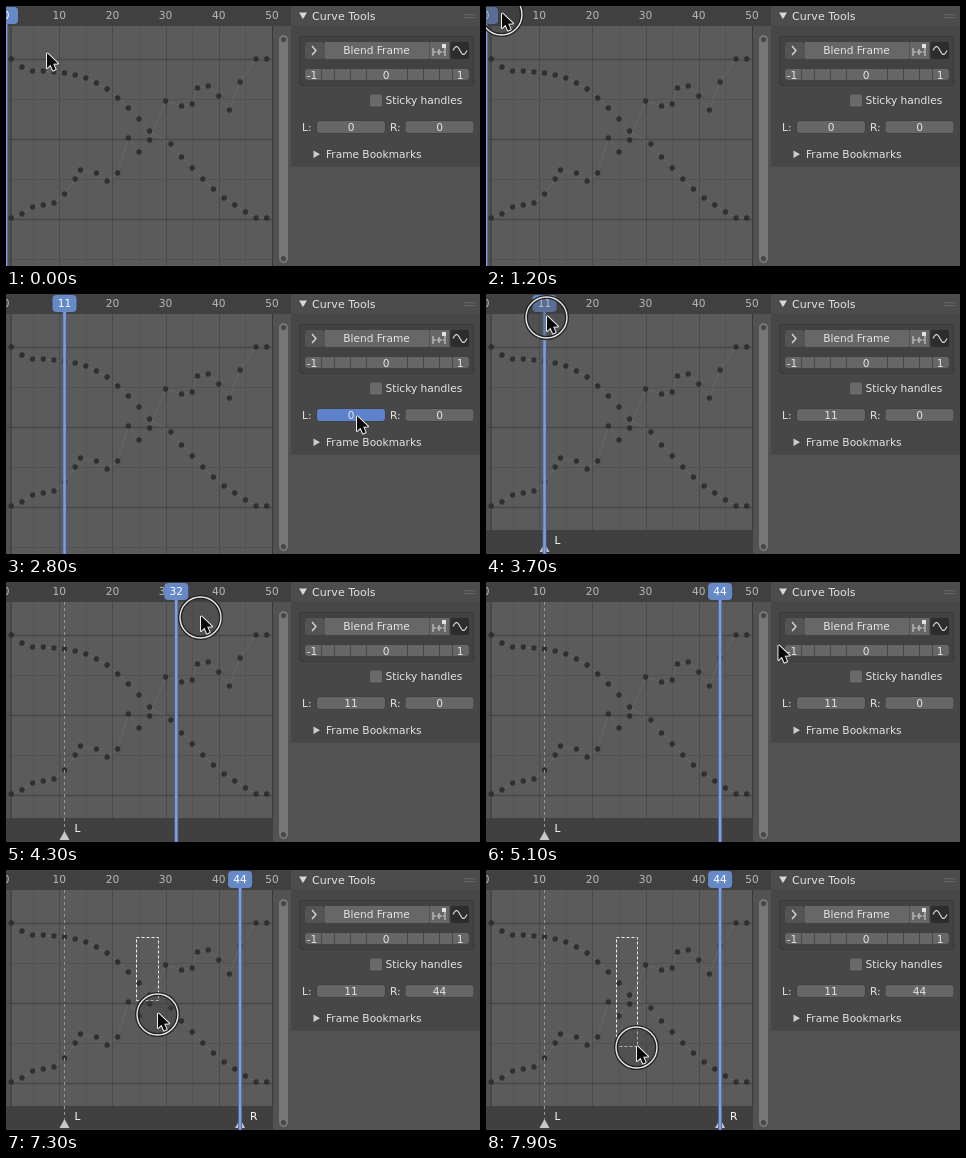
Write an HTML page with a canvas that moves like this. It is 474 by 260 pixels and loops after 8000 ms.

```html
<!DOCTYPE html>
<html lang="en">
<head>
<meta charset="utf-8">
<title>Curve editor</title>
<style>
html, body { margin: 0; width: 100%; height: 100%; overflow: hidden; background: #555; }
canvas { display: block; width: 474px; height: 260px; }
</style>
</head>
<body>
<canvas id="stage"></canvas>
<script>
const W = 474, H = 260, LOOP = 8000, TICK = 100;
const FRAME_W = 5.32, LAG = 100;
const BLUE = '#6689c8', TEXT = '#e4e4e4';
const canvas = document.getElementById('stage');
const ctx = canvas.getContext('2d');
const dpr = window.devicePixelRatio || 1;
canvas.width = W * dpr;
canvas.height = H * dpr;

// Keys as [frame, y]
const falling = [[1, 53], [3, 61], [5, 65], [7, 65], [9, 66], [11, 67], [13, 69], [15, 72], [17, 77],
  [19, 83], [21, 92], [23, 102], [25, 113], [27, 125], [31, 138], [33, 151], [35, 162], [37, 173],
  [39, 183], [41, 192], [43, 199], [45, 206], [47, 212], [49, 212]];
const rising = [[1, 212], [3, 208], [5, 201], [7, 199], [9, 197], [11, 188], [13, 173], [14, 164],
  [17, 167], [19, 175], [21, 167], [23, 132], [25, 146], [27, 134], [30, 95], [33, 100], [35, 98],
  [36, 82], [38, 80], [40, 90], [42, 104], [44, 76], [47, 53], [49, 53]];

// Pointer path as [ms, x, y]
const path = [[0, 41, 47], [600, 2, 8], [1100, 2, 8], [1200, 16, 7], [1800, 59, 8], [1900, 60, 9],
  [2700, 351, 122], [2900, 351, 122], [3600, 61, 22], [3800, 61, 22], [4300, 195, 34], [4500, 232, 38],
  [4800, 232, 38], [5600, 423, 117], [6100, 423, 117], [6500, 202, 80], [6800, 130, 67], [6900, 130, 67],
  [7200, 152, 130], [7300, 152, 143], [7400, 152, 160], [7600, 151, 176], [8000, 151, 176]];
const presses = [[1000, 1900], [3700, 4800], [6900, 8000]];

const frameX = f => f * FRAME_W;

function pointer(t) {
  const i = Math.max(1, path.findIndex(k => k[0] >= t));
  const [t0, x0, y0] = path[i - 1], [t1, x1, y1] = path[i];
  let u = (t - t0) / (t1 - t0);
  if (t1 - t0 >= 600 && i !== 4) u = u * u * (3 - 2 * u);
  return [x0 + (x1 - x0) * u, y0 + (y1 - y0) * u];
}

// The playhead trails the pointer while scrubbing and holds otherwise.
function currentFrame(t) {
  let s = t - LAG;
  if (s < 3700) s = Math.min(Math.max(s, 1000), 1800);
  else s = Math.min(s, 4500);
  return Math.round(pointer(s)[0] / FRAME_W);
}

function rect(x, y, w, h, fill, r = 0) {
  ctx.fillStyle = fill;
  ctx.beginPath();
  ctx.roundRect(x, y, w, h, r);
  ctx.fill();
}

function line(points, color, width = 1, dash = []) {
  ctx.strokeStyle = color;
  ctx.lineWidth = width;
  ctx.setLineDash(dash);
  ctx.beginPath();
  points.forEach(([x, y]) => ctx.lineTo(x, y));
  ctx.stroke();
  ctx.setLineDash([]);
}

function polygon(points, fill) {
  ctx.fillStyle = fill;
  ctx.beginPath();
  points.forEach(([x, y]) => ctx.lineTo(x, y));
  ctx.closePath();
  ctx.fill();
}

function disc(x, y, r, fill) {
  ctx.fillStyle = fill;
  ctx.beginPath();
  ctx.arc(x, y, r, 0, Math.PI * 2);
  ctx.fill();
}

function label(str, x, y, align = 'left', size = 10.6, color = TEXT) {
  ctx.font = `${size}px "DejaVu Sans", sans-serif`;
  ctx.textAlign = align;
  ctx.textBaseline = 'alphabetic';
  ctx.fillStyle = color;
  ctx.fillText(str, x, y);
}

function drawCurve(keys) {
  const points = keys.map(([f, y]) => [frameX(f), y]);
  line(points, 'rgba(125,125,125,.45)', 0.8);
  points.forEach(([x, y]) => disc(x, y, 2.7, '#303030'));
}

function drawMarker(f, name) {
  const x = frameX(f);
  line([[x, 20], [x, 249]], '#999', 1, [3, 3]);
  polygon([[x, 249], [x + 5, 258], [x - 5, 258]], '#c8c8c8');
  label(name, x + 10, 250, 'left', 10.6, '#fff');
}

function drawGraph(t) {
  rect(0, 0, 285, H, '#525252');
  rect(5, 20, 261, H - 20, '#5b5b5b');
  for (let f = 5; f <= 50; f += 5) {
    const x = Math.round(frameX(f)) + 0.5;
    line([[x, 20], [x, H]], f % 10 ? '#545454' : '#4b4b4b');
  }
  for (let i = 0; i < 6; i++) {
    const y = Math.round(53 + i * 39.9) + 0.5;
    line([[0, y], [266, y]], i % 2 ? '#525252' : '#484848', i % 2 ? 1 : 1.4);
  }
  line([[5, 20], [5, H]], '#383838');
  line([[266.5, 20], [266.5, H]], '#383838');
  drawCurve(falling);
  drawCurve(rising);

  if (t >= 2900) {
    rect(0, 236, 267, 24, '#404040');
    drawMarker(11, 'L');
  }
  if (t >= 5800) drawMarker(44, 'R');

  rect(0, 0, 285, 20, '#414141');
  for (let f = 0; f <= 50; f += 10) label(f, frameX(f), 13, 'center', 10.6, '#b8b8b8');

  const now = currentFrame(t), x = frameX(now);
  line([[x, 14], [x, H]], '#4d6590', 4);
  line([[x, 14], [x, H]], '#7da0dc', 2.4);
  rect(x - 12, 1, 24, 17, BLUE, 4);
  label(now, x, 13, 'center', 10.6, '#fff');

  rect(273, 29, 9, 228, '#777', 4.5);
  for (const y of [33.5, 252.5]) disc(277.5, y, 2.6, '#484848');
}

function drawField(x, value, state) {
  const fill = { idle: '#666', hover: '#777', pressed: '#5d82cb' }[state];
  rect(x - 0.5, 114.5, 69, 13, '#3c3c3c', 3.5);
  rect(x, 115, 68, 12, fill, 3);
  label(value, x + 34, 125, 'center');
}

function drawPanel(t) {
  rect(285, 0, 189, H, '#535353');
  rect(285, 0, 189, 161, '#474747');
  rect(285, 0, 189, 20, '#4c4c4c');
  polygon([[293, 6.5], [301, 6.5], [297, 13]], '#d8d8d8');
  label('Curve Tools', 306, 14, 'left', 11.1);
  for (let i = 0; i < 5; i++) {
    for (const y of [8, 11]) rect(458 + i * 2.4, y, 1.2, 1.2, '#777');
  }

  rect(293, 30, 175, 50, '#393939', 4);
  rect(294, 31, 173, 48, '#424242', 3);
  rect(299, 36, 19, 17, '#545454', 3);
  line([[306, 40], [310, 44.5], [306, 49]], '#ddd', 1.3);
  rect(318.5, 36, 104.5, 17, '#676767', 1);
  label('Blend Frame', 370.5, 48, 'center');
  rect(423.5, 36, 20, 17, '#676767', 1);
  line([[427, 42], [427, 50]], '#ddd');
  line([[439, 42], [439, 50]], '#ddd');
  line([[428, 46], [438, 46]], '#ddd', 1, [2, 1]);
  line([[433, 43], [433, 49]], '#ddd');
  rect(436, 38, 4, 4, '#e0e0e0');
  rect(444.5, 36, 18.5, 17, '#2c2c2c', 3);
  ctx.strokeStyle = '#ddd';
  ctx.lineWidth = 1.2;
  ctx.beginPath();
  for (let i = 0; i <= 14; i++) ctx.lineTo(447 + i, 44.5 - 4 * Math.sin(i / 14 * Math.PI * 2));
  ctx.stroke();

  rect(299, 63, 164, 11, '#666', 3);
  for (const x of [315.5, 328.5, 344.5, 360.5, 401.5, 417.5, 433.5, 446.5]) line([[x, 63], [x, 74]], '#474747');
  label('-1', 306, 72.5, 'center');
  label('0', 380, 72.5, 'center');
  label('1', 454, 72.5, 'center');

  rect(364, 88.5, 12, 12, '#6a6a6a', 2);
  label('Sticky handles', 379.5, 98);

  label('L:', 296, 125);
  label('R:', 384, 125);
  const [x, y] = pointer(t);
  const state = (left, from, to) =>
    t >= from && t < to ? 'pressed' : x > left && x < left + 69 && y > 114 && y < 128 ? 'hover' : 'idle';
  drawField(311, t >= 2900 ? 11 : 0, state(311, 2800, 2900));
  drawField(399.5, t >= 5800 ? 44 : 0, state(399, 5700, 5800));

  polygon([[307.5, 144.5], [314, 148.3], [307.5, 152]], '#ccc');
  label('Frame Bookmarks', 320, 152);
}

function drawSelection(t) {
  if (t < 7000) return;
  const [x, y] = pointer(t - LAG);
  ctx.strokeStyle = '#eee';
  ctx.lineWidth = 1;
  ctx.setLineDash([3, 2]);
  ctx.strokeRect(130.5, 67.5, Math.round(x) - 130, Math.round(y) - 67);
  ctx.setLineDash([]);
}

function drawPointer(t) {
  const [x, y] = pointer(t);
  if (presses.some(([from, to]) => t >= from && t < to)) {
    const cx = x - 0.5, cy = y + 1.5;
    disc(cx, cy, 20, 'rgba(60,60,60,.35)');
    for (const [color, width] of [['#222', 4], ['#e8e8e8', 1.4]]) {
      ctx.strokeStyle = color;
      ctx.lineWidth = width;
      ctx.beginPath();
      ctx.arc(cx, cy, 20.5, 0, Math.PI * 2);
      ctx.stroke();
    }
  }
  const arrow = [[0, 0], [0, 15], [3.5, 11.8], [6, 17.5], [8.6, 16.3], [6.2, 10.8], [11, 10.5]]
    .map(([dx, dy]) => [x + dx, y + dy]);
  ctx.lineJoin = 'round';
  line([...arrow, arrow[0]], '#eee', 2);
  polygon(arrow, '#0a0a0a');
  ctx.lineJoin = 'miter';
}

function render(ms) {
  const t = Math.floor(ms % LOOP / TICK) * TICK;
  ctx.setTransform(dpr, 0, 0, dpr, 0, 0);
  drawGraph(t);
  drawPanel(t);
  drawSelection(t);
  drawPointer(t);
}

const start = performance.now();
function loop() {
  render(performance.now() - start);
  requestAnimationFrame(loop);
}
loop();
</script>
</body>
</html>
```
